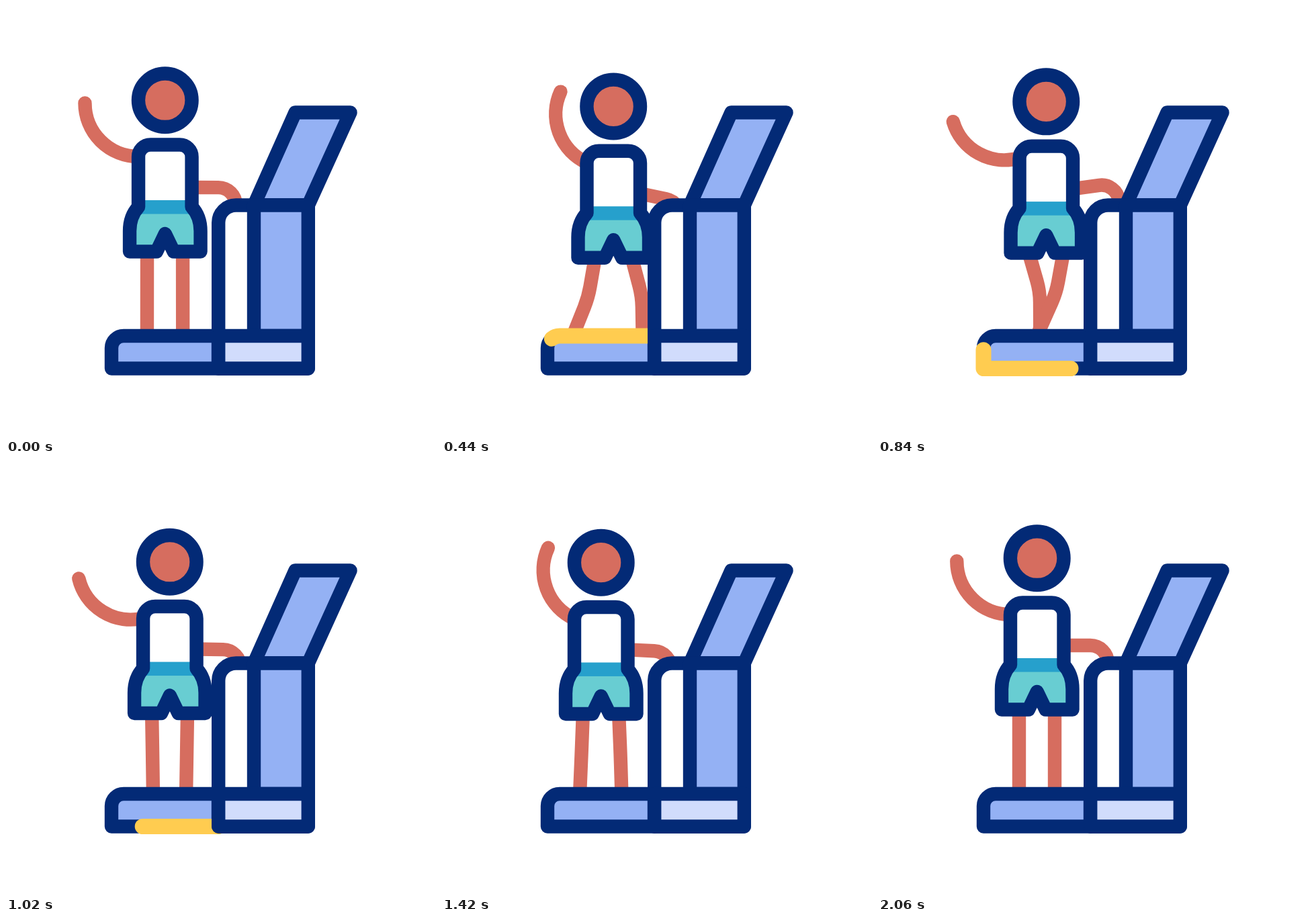
Animation of 640x640 px, one loop 2.4 s. Source, as an HTML page with a canvas:

```html
<!DOCTYPE html>
<html lang="en">
<head>
<meta charset="utf-8">
<title>Treadmill walk</title>
<style>
html, body { margin: 0; height: 100%; overflow: hidden; background: #fff; }
canvas { display: block; width: 100vmin; height: 100vmin; }
</style>
</head>
<body>
<canvas id="stage" width="640" height="640"></canvas>
<script>
const ctx = document.getElementById('stage').getContext('2d');
const { PI, sin, cos, min, max } = Math;
const LOOP = 2400, END = 2060, BEAT = END / 5, LINE = 20.4;
const NAVY = '#032a76', SKIN = '#d66d5f', BLUE = '#94b1f4', PALE = '#d1dcfc',
      YELLOW = '#ffcc50', TEAL = '#68cdd2', WAIST = '#26a0cc', WHITE = '#fff';

const shape = d => new Path2D(d);
const backArm = shape('M117.3 144.5A79.7 79.7 0 0 0 197 224');
const frontArm = shape('M277 270H316A26 26 0 0 1 342 296');
const body = shape('M224 365.5H184V335Q184 313 197 299V224.5A18 18 0 0 1 215 206.5' +
  'H258.5A18 18 0 0 1 276.5 224.5V299Q289.5 313 289.5 335V365.5H249.5L236.7 339Z');
const head = shape('M276.5 140.2a39.8 39.8 0 1 1-79.6 0a39.8 39.8 0 1 1 79.6 0Z');
const deck = shape('M316 539.5H157V509A18 18 0 0 1 175 491H316Z');
const belt = shape('M316 491H175A18 18 0 0 0 157 509V539.5H316');
const frame = shape('M316.2 539.5V322.5A26 26 0 0 1 342.2 296.5H449.8V539.5Z');
const column = shape('M369 296.5H449.8V491H369Z');
const base = shape('M316.2 491H449.8V539.5H316.2Z');
const screen = shape('M430.5 158.5H512.5L449.8 296.5H369Z');

const clamp = (x, low, high) => min(high, max(low, x));
const radians = degrees => degrees * PI / 180;

// Passes through [time, value] points: starts briskly, then eases in and out
function glide(t, ...points) {
  let value = 0, last = 0;
  for (const [time, goal] of points) {
    const u = clamp((t - last) / (time - last), 0, 1);
    const before = value;
    value += (goal - before) * (last ? (1 - cos(PI * u)) / 2 : sin(PI * u / 2));
    if (t <= time) break;
    last = time;
  }
  return value;
}

// swing is 1 with the legs apart and -1 with them crossed, one beat each
function pose(t) {
  const beat = t / BEAT;
  const effort = glide(t, [360, 1], [4 * BEAT, 1], [END, 0]);
  const swing = -effort * cos(PI * clamp(beat, 1, 4)) * (.88 + .05 * beat);
  return {
    swing,
    x: glide(t, [540, 19.3], [1360, 0]),
    y: 5.8 * effort + 3.75 * swing,
    back: glide(t, [480, 25], [910, -19], [1380, 25], [END, 0]),
    front: 1.5 * effort + swing * (13 - 1.65 * beat)
  };
}

function stroke(path, color, width = LINE, cap = 'round') {
  ctx.strokeStyle = color;
  ctx.lineWidth = width;
  ctx.lineCap = cap;
  ctx.stroke(path);
}

function outlined(path, fill) {
  ctx.fillStyle = fill;
  ctx.fill(path);
  stroke(path, NAVY);
}

function arm(path, x, y, angle) {
  ctx.save();
  ctx.translate(x, y);
  ctx.rotate(radians(angle));
  ctx.translate(-x, -y);
  stroke(path, SKIN);
  ctx.restore();
}

// forward runs from -1 (stretched back) to 1 (reaching ahead)
function leg(x, forward) {
  const top = 362, upper = 63, lower = 64, bend = 16;
  const thigh = radians(13.5 * forward + 3 * forward ** 2);
  const shin = radians(12.5 * forward - 12.5 * forward ** 2);
  const kx = x + upper * sin(thigh), ky = top + upper * cos(thigh);
  const path = new Path2D();
  path.moveTo(x, top);
  path.lineTo(kx - bend * sin(thigh), ky - bend * cos(thigh));
  path.quadraticCurveTo(kx, ky, kx + bend * sin(shin), ky + bend * cos(shin));
  path.lineTo(kx + lower * sin(shin), ky + lower * cos(shin));
  stroke(path, SKIN, LINE, 'butt');
}

function drawWalker(t) {
  const { swing, x, y, back, front } = pose(t);
  ctx.save();
  ctx.translate(x, y);
  arm(backArm, 197, 224, back);
  arm(frontArm, 277, 270, front);
  leg(210, -swing);
  leg(263, swing);

  ctx.save();
  ctx.clip(body);
  for (const [color, top, height] of [[WHITE, 200, 90], [TEAL, 300, 70], [WAIST, 289, 20.5]]) {
    ctx.fillStyle = color;
    ctx.fillRect(180, top, 115, height);
  }
  ctx.restore();
  stroke(body, NAVY);
  outlined(head, SKIN);
  ctx.restore();
}

function drawBelt(t) {
  const length = 360;
  const to = clamp(.44 * (t - 92), 0, length), from = clamp(.411 * (t - 423), 0, length);
  if (to <= from) return;
  ctx.setLineDash([to - from, 999]);
  ctx.lineDashOffset = -from;
  stroke(belt, YELLOW, 23);
  ctx.setLineDash([]);
}

function drawMachine(t) {
  outlined(deck, BLUE);
  drawBelt(t);
  outlined(screen, BLUE);
  outlined(frame, WHITE);
  outlined(column, BLUE);
  outlined(base, PALE);
}

function draw(now) {
  const t = min(now % LOOP, END);
  ctx.fillStyle = WHITE;
  ctx.fillRect(0, 0, 640, 640);
  ctx.lineJoin = 'round';
  drawWalker(t);
  drawMachine(t);
}

const start = performance.now();
function tick() {
  draw(performance.now() - start);
  requestAnimationFrame(tick);
}
tick();
</script>
</body>
</html>
```
